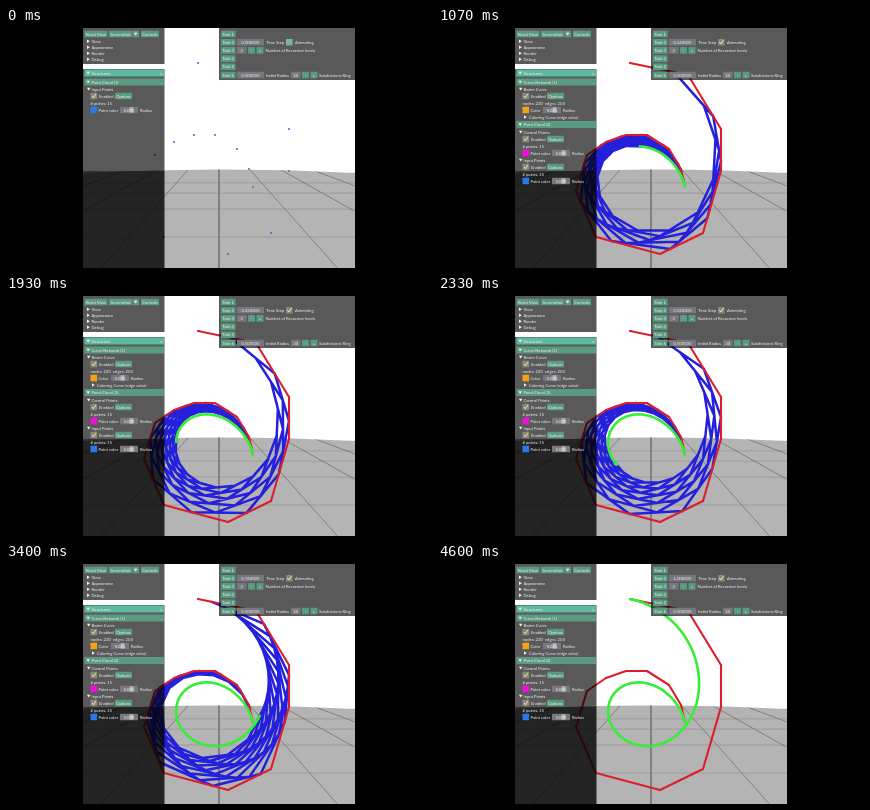
These frames come from a looping animation (426 by 240 pixels, 4.67 s). An HTML page:

```html
<!DOCTYPE html>
<html lang="en">
<head>
<meta charset="utf-8">
<title>Bezier curve construction</title>
<style>
  html, body { margin: 0; width: 100%; height: 100%; overflow: hidden; background: #000; }
  svg { display: block; width: 100vw; height: 100vh; }
  text { font: 4.15px Lato, sans-serif; fill: #f2f2f2; white-space: pre; }
  .line { fill: none; stroke-linejoin: round; stroke-linecap: round; }
</style>
</head>
<body>
<svg viewBox="0 0 426 240">
  <defs>
    <clipPath id="view"><rect x="77" width="272" height="240"/></clipPath>
    <clipPath id="ground"><path d="M77 145Q213 138 350 145V240H77Z"/></clipPath>
  </defs>
  <rect width="426" height="240"/>
  <g clip-path="url(#view)">
    <rect x="77" width="273" height="240" fill="#fff"/>
    <g clip-path="url(#ground)" fill="none" stroke="#5e5e54">
      <rect x="77" y="138" width="273" height="102" fill="#b4b4b4" stroke="none"/>
      <path id="rows" stroke-width=".7" opacity=".4"/>
      <path id="columns" stroke-width=".8" opacity=".75"/>
      <path d="M213 138V240" stroke-width="1.2"/>
    </g>
    <g id="points" fill="#3468d8"></g>
    <g id="curves">
      <path id="hull" class="line" stroke="#2420dc" stroke-width="2.5"/>
      <path id="control" class="line" stroke="#dc1e2c" stroke-width="2.1"/>
      <path id="curve" class="line" stroke="#35ee35" stroke-width="2.6"/>
    </g>
    <path d="M77 0H158.500V36H77ZM77 41H158.500V143H77ZM213 0H350V52H213Z" opacity=".65"/>
    <path d="M77 143H158.500V240H77Z" opacity=".8"/>
    <g id="menu"></g>
    <g id="before"></g>
    <g id="after"></g>
  </g>
</svg>
<script>
const $ = id => document.getElementById(id);
const LOOP = 4670, FRAME = 200 / 3, STEPS = 67, SAMPLES = 100;
const GREEN = '#5a9a80', FIELD = '#77777f', BLUE = '#2a78ee';

// Control points, from the inner end of the spiral outwards.
const points = [
  [247, 159], [243, 141], [231, 121], [209, 107], [188, 107],
  [168, 114], [149, 127], [138, 163], [158, 209], [222, 226],
  [265, 205], [283, 143], [283, 101], [250, 47], [192, 35]
];

function add(parent, name, attrs, content = '') {
  const el = document.createElementNS('http://www.w3.org/2000/svg', name);
  for (const key in attrs) el.setAttribute(key, attrs[key]);
  el.textContent = content;
  parent.append(el);
  return el;
}

const label = (g, x, y, s, anchor = 'start') =>
  add(g, 'text', { x, y: y + 1.5, 'text-anchor': anchor }, s);

const box = (g, x, y, width, height, fill) =>
  add(g, 'rect', { x, y: y - height / 2, width, height, fill, rx: .5 });

function button(g, x, y, w, s, fill = GREEN) {
  box(g, x, y, w, 6.6, fill);
  return label(g, x + w / 2, y, s, 'middle');
}

function arrow(g, x, y, open) {
  const d = open ? `M${x} ${y - 1.3}h3.400l-1.700 2.800z` : `M${x} ${y - 1.7}v3.400l2.800-1.700z`;
  add(g, 'path', { d, fill: '#f2f2f2' });
}

function check(g, x, y, on) {
  box(g, x, y, 6.6, 6.6, on ? '#8a8a78' : '#79b5a5');
  if (on) add(g, 'path', {
    d: `M${x + 1.4} ${y}l1.500 1.700 2.500-3.600`, fill: 'none', stroke: '#e8f4dc', 'stroke-width': .9
  });
}

function header(g, y, s, fill = GREEN) {
  box(g, 78.5, y, 79.5, 6.8, fill);
  arrow(g, 80.5, y, true);
  label(g, 85.5, y, s);
}

// One structure: title, options, info line and colour row.
function structure(g, y, title, info, color, name) {
  arrow(g, 81, y, true);
  label(g, 85.5, y, title);
  check(g, 84.5, y + 7, true);
  label(g, 93, y + 7, 'Enabled');
  button(g, 109, y + 7, 17, 'Options');
  label(g, 84.5, y + 14, info);
  box(g, 84.5, y + 21, 6.6, 6.6, color);
  label(g, 92.5, y + 21, name);
  const x = name === 'Color' ? 105 : 114;
  box(g, x, y + 21, 18, 6.6, FIELD);
  box(g, x + 9.5, y + 21, 4, 5.4, '#b3b3b3');
  label(g, x + 9, y + 21, '0.005', 'middle');
  label(g, x + 20, y + 21, 'Radius');
}

function stepper(g, x, y, value) {
  button(g, x, y, 9.5, value, FIELD);
  button(g, x + 11, y, 7, '-');
  button(g, x + 19.5, y, 7, '+');
}

function buildMenu(g) {
  button(g, 78.5, 6, 23, 'Reset View');
  button(g, 103, 6, 23, 'Screenshot');
  box(g, 126.5, 6, 6.5, 6.6, GREEN);
  arrow(g, 128, 6, true);
  button(g, 135, 6, 18, 'Controls');
  ['View', 'Appearance', 'Render', 'Debug'].forEach((s, i) => {
    arrow(g, 81, 13.3 + 6 * i, false);
    label(g, 85.5, 13.3 + 6 * i, s);
  });
  header(g, 45, 'Structures', '#5fb8a0');
  label(g, 154, 45, '×');
  for (let i = 0; i < 6; i++) button(g, 215, 6 + 8.2 * i, 14.5, `Task ${i + 1}`);
  label(g, 260, 14.2, 'Time Step');
  label(g, 289, 14.2, 'Animating');
  stepper(g, 231, 22.4, '2');
  label(g, 259.5, 22.4, 'Number of Recursion levels');
  button(g, 231, 47, 27, '0.500000', FIELD);
  label(g, 260, 47, 'Initial Radius');
  stepper(g, 285, 47, '30');
  label(g, 313, 47, 'Subdivisions Ring');
  return button(g, 231, 14.2, 27, '0.000000', FIELD);
}

function buildStructures() {
  const a = $('before'), b = $('after'), count = '# points: 15';
  header(a, 54, 'Point Cloud (1)');
  structure(a, 61, 'Input Points', count, BLUE, 'Point color');
  check(a, 280, 14.2, false);

  header(b, 54, 'Curve Network (1)');
  structure(b, 61, 'Bezier Curve', 'nodes: 220  edges: 204', '#f5a21b', 'Color');
  arrow(b, 86, 89, false);
  label(b, 91, 89, 'Coloring Curve (edge color)');
  header(b, 96.5, 'Point Cloud (2)');
  structure(b, 104, 'Control Points', count, '#f010dc', 'Point color');
  structure(b, 132, 'Input Points', count, BLUE, 'Point color');
  check(b, 280, 14.2, true);
}

// Ground lines share a vanishing point at (213, 107).
function buildGround() {
  let rows = '', columns = '';
  for (let i = -4; i <= 4; i++)
    if (i) columns += `M213 107L${213 + i * .89 * 133} 240`;
  for (let i = 0; i < 4; i++)
    rows += `M77 ${107 + 1 / (.0098 + .0037 * i)}H350`;
  $('rows').setAttribute('d', rows);
  $('columns').setAttribute('d', columns);
}

const reduce = (pts, t) => pts.slice(1).map((p, i) =>
  pts[i].map((v, k) => v + (p[k] - v) * t));

const path = pts => 'M' + pts.map(p => p.map(v => v.toFixed(2)).join(' ')).join('L');

function bezier(t) {
  let pts = points;
  while (pts.length > 1) pts = reduce(pts, t);
  return pts[0];
}

const timeText = buildMenu($('menu'));
buildStructures();
buildGround();
$('control').setAttribute('d', path(points));
for (const [cx, cy] of points) add($('points'), 'circle', { cx, cy, r: 1 });

let shown = -1;

function draw(frame) {
  const t = Math.min(1, frame / STEPS), running = frame > 0;
  $('curves').style.display = $('after').style.display = running ? '' : 'none';
  $('before').style.display = running ? 'none' : '';
  timeText.textContent = t.toFixed(2) + '0000';

  let hull = '';
  for (let pts = reduce(points, t); t < 1 && pts.length > 1; pts = reduce(pts, t)) hull += path(pts);
  $('hull').setAttribute('d', hull);
  const trace = Array.from({ length: SAMPLES }, (_, i) => bezier(t * i / (SAMPLES - 1)));
  $('curve').setAttribute('d', path(trace));
}

function tick() {
  // Half a centisecond early, since frame delays are rounded to centiseconds.
  const frame = Math.floor((performance.now() % LOOP + 5) / FRAME);
  if (frame !== shown) draw(shown = frame);
  requestAnimationFrame(tick);
}
tick();
</script>
</body>
</html>
```
